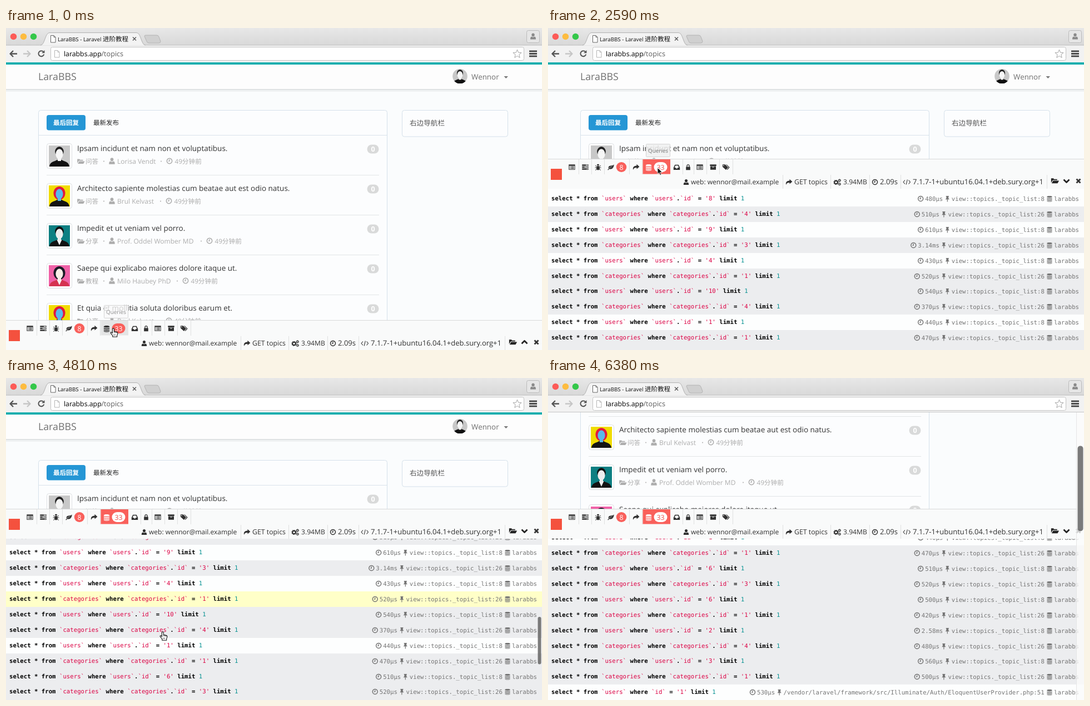
An HTML page with a canvas that plays this animation: 964 px wide and 581 px high, repeating every 6720 ms.

```html
<!DOCTYPE html>
<html lang="zh">
<head>
<meta charset="utf-8">
<title>LaraBBS</title>
<style>
html, body { margin: 0; width: 100%; height: 100%; overflow: hidden; background: #fff; }
canvas { display: block; width: 964px; height: 581px; }
</style>
</head>
<body>
<canvas id="stage"></canvas>
<script>
const W = 964, H = 581, LOOP = 6720;
const UI = '"Open Sans", "Noto Sans CJK SC", "Noto Sans CJK", sans-serif';
const MONO = '"DejaVu Sans Mono", monospace';
const CHAR = 6.43, ROW = 27.9;

const canvas = document.getElementById('stage');
const ctx = canvas.getContext('2d');
const dpr = window.devicePixelRatio || 1;
canvas.width = W * dpr;
canvas.height = H * dpr;
ctx.scale(dpr, dpr);
ctx.textRendering = 'geometricPrecision';

// ---------- helpers ----------
function rect(x, y, w, h, fill) {
  ctx.fillStyle = fill;
  ctx.fillRect(x, y, w, h);
}

function round(x, y, w, h, r, fill, stroke) {
  ctx.beginPath();
  ctx.roundRect(x, y, w, h, r);
  if (fill) { ctx.fillStyle = fill; ctx.fill(); }
  if (stroke) { ctx.strokeStyle = stroke; ctx.lineWidth = 1; ctx.stroke(); }
}

function oval(x, y, rx, ry, fill) {
  ctx.beginPath();
  ctx.ellipse(x, y, rx, ry, 0, 0, Math.PI * 2);
  ctx.fillStyle = fill;
  ctx.fill();
}

// Baselines sit on whole pixels to keep the glyphs crisp.
function text(s, x, y, size, color, { weight = 400, font = UI, align = 'left' } = {}) {
  ctx.font = `${weight} ${size}px ${font}`;
  ctx.textAlign = align;
  ctx.fillStyle = color;
  ctx.fillText(s, x, Math.round(y));
}

function path(d, x, y, { fill, stroke, width = 1, scale = 1 }) {
  const p = new Path2D(d);
  ctx.save();
  ctx.translate(x, y);
  ctx.scale(scale, scale);
  ctx.lineJoin = 'round';
  ctx.lineWidth = width;
  if (fill) { ctx.fillStyle = fill; ctx.fill(p, 'evenodd'); }
  if (stroke) { ctx.strokeStyle = stroke; ctx.stroke(p); }
  ctx.restore();
}

function clip(x, y, w, h, draw) {
  ctx.save();
  ctx.beginPath();
  ctx.rect(x, y, w, h);
  ctx.clip();
  draw();
  ctx.restore();
}

function stepAt(keys, t) {
  let value = keys[0][1];
  for (const [at, v] of keys) if (t >= at) value = v;
  return value;
}

// ---------- icons, each in a 14 x 14 box ----------
const ICONS = {
  user: 'M7 1a3 3 0 0 1 3 3c0 2-1 3.5-3 3.5S4 6 4 4a3 3 0 0 1 3-3zM4 7.5c1.8 1.4 4.2 1.4 6 0c2 .5 2.5 2 2.5 5.5h-11c0-3.5 .5-5 2.5-5.5z',
  folder: 'M0 11V2.5h4.5l1 1.5h6V6H3.2zM3.8 7H15l-2.8 5H1z',
  clock: 'M7 1.5a5.5 5.5 0 1 0 .01 0zM7 3a4 4 0 1 1-.01 0zM6.3 4h1.4v3.8H4.8V6.5h1.5z',
  db: 'M1.5 2.8c0-2.2 11-2.2 11 0v.8c0 2-11 2-11 0zM1.5 5.2c1 1.6 10 1.6 11 0v1.5c0 2-11 2-11 0zM1.5 8.2c1 1.6 10 1.6 11 0v1.5c0 2-11 2-11 0zM1.5 11c1 1.6 10 1.6 11 0v1c0 2-11 2-11 0z',
  pin: 'M4 1h6v1.5H9.3V6L11.3 8.5H7.7V13L7 14L6.3 13V8.5H2.7L4.7 6V2.5H4z',
  list: 'M1 2h12v10H1zM2 4.5h10V11H2zM3 5.4h1.3v1H3zM5.2 5.4H11v1H5.2zM3 7.3h1.3v1H3zM5.2 7.3H11v1H5.2zM3 9.1h1.3v1H3zM5.2 9.1H11v1H5.2z',
  tasks: 'M1 2h12v2.7H1zM1 5.7h12v2.7H1zM1 9.4h12V12H1zM8 2.9h4v.9H8zM5.5 6.6H12v.9H5.5zM9.5 10.3H12v.8H9.5z',
  bug: 'M7 4.4a3.1 4.2 0 1 0 .01 0zM4.7 3.9a2.3 2.6 0 0 1 4.6 0zM1.3 7.6h2.6v1H1.3zM10.1 7.6h2.6v1h-2.6zM2 3.6l2.6 1.9-.6.8L1.6 4.4zM12 3.6L9.4 5.5l.6.8 2.4-1.9zM1.8 12.4l2.4-2 .5.9-2.3 1.9zM12.2 12.4l-2.4-2-.5.9 2.3 1.9z',
  leaf: 'M13 2C12.6 9 9 11.6 4 10.5L2 12.7 .8 12l2.2-2.2C1.5 6 4 4.5 8 4.2c2 0 3.5-.7 5-2.2zM4 9.3C5 7.8 7 6.8 9.5 6.6V6C7 6 5 7 3.7 8.7z',
  share: 'M8.5 1.6l5.2 4.5-5.2 4.5V8C4.5 8 3 9 2 12.3C.4 7.5 3.5 4.4 8.5 4.3z',
  inbox: 'M3.5 2.5h7L13 8v4.2H1V8zM4.5 4L3 8h2l.8 1.6h2.4L9 8h2L9.5 4z',
  lock: 'M3 6.5h8v6H3zM4.2 6.5V4.5a2.8 2.8 0 0 1 5.6 0v2H8.4v-2a1.4 1.4 0 0 0-2.8 0v2z',
  archive: 'M1 2h12v2.8H1zM1.7 5.5h10.6V12H1.7zM5.3 6.6h3.4v1H5.3z',
  tags: 'M.6 2h5l5.6 5.4-4.2 4.8L.6 6.6zM2.6 3.2a.9.9 0 1 0 .01 0zM7.2 2h1.2L14 7.4 9.8 12.2l-.9-.7 3.3-4.1z'
};

function icon(name, cx, cy, color, scale = 1) {
  path(ICONS[name], cx - 7 * scale, cy - 7 * scale, { fill: color, scale });
}

function cog(x, y, r, color) {
  ctx.strokeStyle = color;
  const ring = (radius, width, dash) => {
    ctx.setLineDash(dash);
    ctx.lineWidth = width;
    ctx.beginPath();
    ctx.arc(x, y, radius, 0, Math.PI * 2);
    ctx.stroke();
  };
  ring(r * 0.62, r * 0.45, []);
  ring(r * 0.9, r * 0.3, [r * 0.35, r * 0.356]);
  ctx.setLineDash([]);
}

function lines(d, x, y, stroke, width) {
  path(d, x, y, { stroke, width });
}

// ---------- browser window ----------
function pageIcon(x, y, color) {
  path('M.5 .5h5.5l3 3v9.5h-8.5zM6 .5v3h3', x, y, { fill: '#fff', stroke: color });
}

function browser() {
  const strip = ctx.createLinearGradient(0, 0, 0, 31);
  strip.addColorStop(0, '#e8e8e8');
  strip.addColorStop(1, '#d8d8d8');
  rect(0, 0, W, 31, strip);
  ['#fc5b57', '#fdbc40', '#34c84a'].forEach((c, i) => oval(13.5 + 18 * i, 15.5, 5.8, 5.8, c));

  rect(0, 31, W, 31, '#f2f2f2');
  rect(0, 30.5, W, 1, '#bdbdbd');
  path('M62 31.5C70 31 70 9 78 8.5H235C243 9 243 31 251 31.5z', 0, 0, { fill: '#f3f3f3' });
  lines('M62 31C70 31 70 9 78 8.5H235C243 9 243 31 251 31', 0, 0, '#b2b2b2', 1);
  path('M251 13h20q3 0 4 3l3 8q0 3-3 3h-18q-3 0-4-3l-4-9q0-2 2-2z', 0, 0, { fill: '#d0d0d0', stroke: '#b4b4b4' });
  pageIcon(80, 13, '#666');
  text('LaraBBS - Laravel', 93, 23.5, 9.75, '#111');
  text('进阶教程', 174, 24, 11.5, '#111');
  lines('M0 0L6 6M6 0L0 6', 228, 16.5, '#555', 1.4);
  round(936.5, 4.5, 23, 22, 3, '#e6e6e6', '#bbb');
  icon('user', 948, 15, '#8a8a8a', 0.9);

  lines('M14 6H2M7 .5L1.5 6 7 11.5', 6, 40.5, '#555', 2.4);
  lines('M0 6H12M7 .5L12.5 6 7 11.5', 31, 40.5, '#c6c6c6', 2.4);
  lines('M9.8 3A5 5 0 1 0 10.8 7.5', 57.5, 40, '#555', 2);
  path('M12.5 0v5.2H7.2z', 57, 40, { fill: '#555' });

  round(80.5, 34.5, 851, 24, 3, '#fff', '#c2c2c2');
  pageIcon(87, 40, '#b5b5b5');
  text('larabbs.app', 104, 51, 12.3, '#000');
  text('/topics', 171.5, 51, 12.6, '#5c5c5c');
  let star = '';
  for (let i = 0; i < 10; i++) {
    const r = i % 2 ? 3.5 : 8, a = i * Math.PI / 5;
    star += (i ? 'L' : 'M') + Math.sin(a) * r + ' ' + -Math.cos(a) * r;
  }
  lines(star + 'z', 919.5, 47, '#a5a5a5', 1);
  for (const y of [40.5, 45, 49.5]) rect(941, y, 14, 2.8, '#444');
}

// ---------- forum page ----------
const TOPICS = [
  ['Ipsam incidunt et nam non et voluptatibus.', '问答', 'Lorisa Vendt', 269, 0],
  ['Architecto sapiente molestias cum beatae aut est odio natus.', '问答', 'Brul Kelvast', 268, 1],
  ['Impedit et ut veniam vel porro.', '分享', 'Prof. Oddel Womber MD', 341, 2],
  ['Saepe qui explicabo maiores dolore itaque ut.', '教程', 'Milo Haubey PhD', 298, 3],
  ['Et quia et mollitia soluta doloribus earum et.', '分享', 'Brul Kelvast', 268, 1]
];

// background, body, hair, head, collar
const LOOKS = [
  ['#c8c8c8', '#111', '#222', '#f6f6f6', '#111'],
  ['#f0dc00', '#141414', '#e2173f', '#5ab8ea', '#141414'],
  ['#0d7f82', '#131313', '#111', '#eee', '#f4f4f4'],
  ['#f062a8', '#d53350', '#1b1a26', '#fbeee8', '#f4f4f4']
];

function avatar(x, y, size, kind) {
  const [bg, body, hair, head, collar] = LOOKS[kind];
  const longHair = kind % 2;
  clip(x, y, size, size, () => {
    ctx.translate(x, y);
    ctx.scale(size / 38, size / 38);
    rect(0, 0, 38, 38, bg);
    oval(19, longHair ? 14 : 11, longHair ? 10.5 : 7.8, longHair ? 12 : 9, hair);
    path('M1 38C2 29 10 29 15 26q4 3 8 0C28 29 36 29 37 38z', 0, 0, { fill: body });
    path('M14.5 26h9L19 36z', 0, 0, { fill: collar });
    rect(16, 20, 6, 8, head);
    oval(19, 15.5, 6.6, 9.3, head);
  });
}

function topic([title, category, author, end, kind], i) {
  const y = 208 + 72 * i, grey = '#adadad';
  round(73.5, y + 0.5, 45, 45, 4, '#fff', '#dcdfe2');
  avatar(77, y + 4, 38, kind);
  text(title, 128, y + 14, 13.5, '#333');
  icon('folder', 134.5, y + 32.5, grey, 0.9);
  text(category, 143, y + 36.5, 11.6, grey);
  icon('user', 190.5, y + 32, grey, 0.95);
  text(author, 200, y + 36.8, 12, grey);
  for (const x of [176, end + 10]) oval(x, y + 32.5, 1, 1, grey);
  icon('clock', end + 25, y + 32, grey, 0.98);
  text('49分钟前', end + 34.5, y + 36.5, 11.7, grey);
  round(649.5, y + 2.5, 21, 16, 8, '#d9dada');
  text('0', 660, y + 15, 12.5, '#fff', { weight: 700, align: 'center' });
  rect(73, y + 57, 598, 1, '#e2e5e7');
}

function page(scroll) {
  rect(0, 62, W, H - 62, '#fafcfd');
  ctx.save();
  ctx.translate(0, -scroll);
  rect(0, 62, W, 4, '#14aeae');
  rect(0, 66, W, 44, '#fdfdfd');
  rect(0, 110, W, 2, '#dfe2e3');
  rect(0, 112, W, 3, '#f0f2f3');
  text('LaraBBS', 58, 94, 17.8, '#707070');
  ctx.save();
  ctx.beginPath();
  ctx.arc(816.5, 87, 13.3, 0, Math.PI * 2);
  ctx.clip();
  avatar(803, 73.5, 27, 0);
  ctx.restore();
  text('Wennor', 837, 92.5, 13.4, '#707070');
  path('M0 0h7.5L3.75 4z', 895.5, 87, { fill: '#777' });

  round(58.5, 148.5, 627, 700, 4, '#fcfdfe', '#d5e1ea');
  rect(59, 193, 626, 1, '#d9e3eb');
  round(73, 157, 70, 27.5, 4, '#2596d5');
  text('最后回复', 108, 174.5, 11.5, '#fff', { weight: 700, align: 'center' });
  text('最新发布', 157, 174.5, 11.5, '#222');
  round(712.5, 148.5, 190, 47.5, 4, '#fcfdfe', '#d5e1ea');
  text('右边导航栏', 726, 176.4, 12.6, '#555');
  TOPICS.forEach(topic);
  ctx.restore();
}

// ---------- query panel ----------
// table (u or c), id, time; a trailing w marks a plain white row
const QUERIES = ('u 8 480µs w,c 4 510µs,u 9 610µs w,c 3 3.14ms,u 4 430µs w,c 1 520µs,u 10 540µs,' +
  'c 4 370µs,u 1 440µs w,c 1 470µs,u 6 510µs,c 3 520µs,u 6 500µs,c 1 420µs,u 2 2.58ms,' +
  'c 4 480µs,u 3 560µs,c 1 500µs,a 1 530µs w').split(',').map(s => s.split(' '));

function sql(s, x, y) {
  for (const m of s.matchAll(/`[^`]*`|'[^']*'|\d+|[^`'\d]+/g)) {
    const word = m[0], quoted = /[`']/.test(word[0]);
    const color = quoted ? '#dc0043' : /\d/.test(word) ? '#009090' : '#000';
    text(word, x + m.index * CHAR, y, 10.68, color, { font: MONO, weight: color === '#000' ? 700 : 400 });
  }
}

function query([kind, id, time, white], top, hot) {
  rect(0, top, W, ROW + 0.1, hot ? '#ffffc8' : white ? '#fdfefe' : '#ecedef');
  const table = kind === 'c' ? '`categories`' : '`users`';
  const field = kind === 'a' ? '`id`' : table + '.`id`';
  const base = top + 17, mid = top + 14, grey = '#757575';
  sql(`select * from ${table} where ${field} = '${id}' limit 1`, 6, base);

  const place = {
    u: 'view::topics._topic_list:8',
    c: 'view::topics._topic_list:26',
    a: '/vendor/laravel/framework/src/Illuminate/Auth/EloquentUserProvider.php:51'
  }[kind];
  const placeX = 893 - place.length * CHAR;
  const timeX = placeX - 15.5 - time.length * CHAR;
  const mono = (s, x) => text(s, x, base + 1, 10.68, grey, { font: MONO });
  icon('clock', timeX - 8, mid, grey, 0.95);
  mono(time, timeX);
  icon('pin', placeX - 7.5, mid, grey, 0.85);
  mono(place, placeX);
  icon('db', 902, mid, grey, 0.85);
  mono('larabbs', 910);
}

function queries(scroll, hover) {
  rect(0, 290, W, H - 290, '#fdfefe');
  clip(0, 290, W, H - 290, () => QUERIES.forEach((q, i) => {
    const top = Math.round(294 + ROW * i - scroll);
    if (top > 255 && top < H) query(q, top, i === hover);
  }));
}

// ---------- debug bar ----------
const TABS = [['list', 43], ['tasks', 67], ['bug', 90], ['leaf', 113], ['share', 158], ['inbox', 231.5],
  ['lock', 252], ['list', 273], ['archive', 297], ['tags', 320]];

function badge(label, x, y, w, fill, color) {
  round(x - w / 2, y - 9, w, 18, 9, fill);
  text(label, x, y + 4.5, 12.3, color, { align: 'center' });
}

function bar(top, open, fading) {
  const dark = '#303030', red = '#f9605b';
  const tabY = top + 15, mid = top + 42, base = top + 46;
  rect(0, top, W, 54, '#f9fafa');
  rect(0, top, W, 1, '#d8d9da');
  rect(5, top + 18, 20, 20, '#f4513e');

  for (const x of [55, 78, 101, 146, 169, 242, 262, 285, 308, 332]) rect(x, top + 1, 1, 27, '#e0e1e1');
  for (const [name, x] of TABS) icon(name, x, tabY, dark, 0.95);
  badge('8', 132, tabY, 18.5, red, '#fff');
  rect(170.5, top + 1, 49.5, 26.5, !open ? '#e4e5e5' : fading ? '#f2a9a9' : red);
  icon('db', 181, tabY + 0.5, !open ? dark : fading ? '#d08f8f' : '#fff', 0.95);
  badge('33', 202.5, tabY, 24, open ? '#fff' : red, open ? '#ee4f4a' : '#fff');

  for (const x of [422, 508, 578, 634, 897]) rect(x, top + 29, 1, 25, '#dfe0e0');
  icon('user', 248.5, mid, dark, 0.85);
  text('web: wennor@mail.example', 257, base, 12, dark);
  icon('share', 433, mid, dark, 0.95);
  text('GET topics', 443, base, 12.3, dark);
  cog(518, mid + 0.5, 4.4, dark);
  cog(524.3, mid - 3, 2.6, dark);
  cog(524.3, mid + 3.6, 2.6, dark);
  text('3.94MB', 531, base, 12.1, dark);
  icon('clock', 588, mid, dark, 0.95);
  text('2.09s', 597, base, 13, dark);
  lines('M3 0L0 3.5 3 7M9.5 0l3 3.5-3 3.5M7.3-1L5.2 8', 639, mid - 3.5, dark, 1.1);
  text('7.1.7-1+ubuntu16.04.1+deb.sury.org+1', 656, base, 13, dark);
  icon('folder', 911.5, top + 39.5, '#222', 0.95);
  lines(open ? 'M0 0l5 5 5-5' : 'M0 5l5-5 5 5', 927.5, top + 37.5, '#222', 2.8);
  lines('M0 0l7 7M7 0L0 7', 950.5, top + 36.5, '#333', 2.8);
}

function tooltip(top, strong) {
  round(176.5, top - 26.5, 43, 23, 1, strong ? 'rgba(240,240,240,.85)' : 'rgba(250,250,250,.78)', '#d4d4d4');
  text('Queries', 198, top - 11, 9.9, strong ? '#777' : '#8f8f8f', { align: 'center' });
}

// ---------- motion ----------
// start, end, steps, from x, y, to x, y
const MOVES = [
  [1070, 1990, 7, 193, 542, 196, 252],
  [2590, 3610, 8, 197, 252, 203, 430],
  [3910, 4060, 2, 204, 448, 206, 475],
  [4360, 4660, 3, 210, 505, 282, 458],
  [5470, 6380, 7, 889, 503, 972, 330]
];
const PANEL_SCROLL = [[0, 0], [4810, 48.5], [4960, 150], [5110, 243]];
const PAGE_SCROLL = [[0, 0], [5110, 80], [5260, 196]];
const HOVER = [[0, -1], [4660, 5], [4960, 11], [5110, 14], [5620, 16], [5920, -1]];

function pointer(t) {
  let pos = [193, 542];
  for (const [t0, t1, n, x0, y0, x1, y1] of MOVES) {
    if (t < t0) break;
    const k = Math.floor(Math.min(1, (t - t0) / (t1 - t0)) * (n - 1) + 0.02) / (n - 1);
    const e = k * k * (3 - 2 * k);
    pos = [x0 + (x1 - x0) * e, y0 + (y1 - y0) * e];
  }
  return pos;
}

function cursor(t) {
  const [x, y] = pointer(t);
  if (t >= 2140 && t < 3610 && y < 290) {
    path('M0 0v11.5l2.7-2.4 2 4.4 2-.9-2-4.2h3.8z', x, y, { fill: '#111', stroke: '#fff', width: 0.8 });
  } else {
    path('M-1.6 1.4a1.5 1.5 0 0 1 3 0v4l4.6 1c1.6.4 2.1 1.2 1.8 3l-1.1 3.2v2.6H-1.2v-2.2L-4.6 8.6c-.9-1.5 .9-2.4 1.8-1.2l1.2 1.2z',
      x, y, { fill: '#fff', stroke: '#111', width: 1.1 });
    lines('M1.4 5.5v2.8M3.5 6.3v2M5.5 6.8v1.8M1 10.5v2.5M3.2 10.5v2.5', x, y, '#111', 0.7);
  }
}

function scrollbars(t, panelScroll, pageScroll) {
  const shade = 'rgba(95,95,95,.82)';
  if (t >= 4660 && t < 6080) round(956.5, 416 + panelScroll * 0.308, 6, 85.5, 3, shade);
  if (t < 5110) return;
  const top = 64 + pageScroll * 0.298, wide = t >= 6080;
  if (wide) {
    rect(950, 62, 14, H - 62, 'rgba(252,252,252,.78)');
    rect(950, 62, 1, H - 62, '#e6e6e6');
  }
  round(wide ? 952.5 : 956.5, top, wide ? 10 : 6, 154, wide ? 5 : 3, shade);
}

function draw(t) {
  const open = t >= 1070, top = open ? 236 : 527;
  const panelScroll = stepAt(PANEL_SCROLL, t), pageScroll = stepAt(PAGE_SCROLL, t);
  clip(0, 62, W, H - 62, () => page(pageScroll));
  if (open) queries(panelScroll, stepAt(HOVER, t));
  bar(top, open, t < 1220);
  if (t < 1220 || (t >= 1990 && t < 2740)) tooltip(top, t >= 1990);
  scrollbars(t, panelScroll, pageScroll);
  browser();
  if (pageScroll > 0) rect(0, 61, W, 1, '#c4c4c4');
  cursor(t);
}

const start = performance.now();
function tick() {
  draw((performance.now() - start) % LOOP);
  requestAnimationFrame(tick);
}
tick();
</script>
</body>
</html>
```
